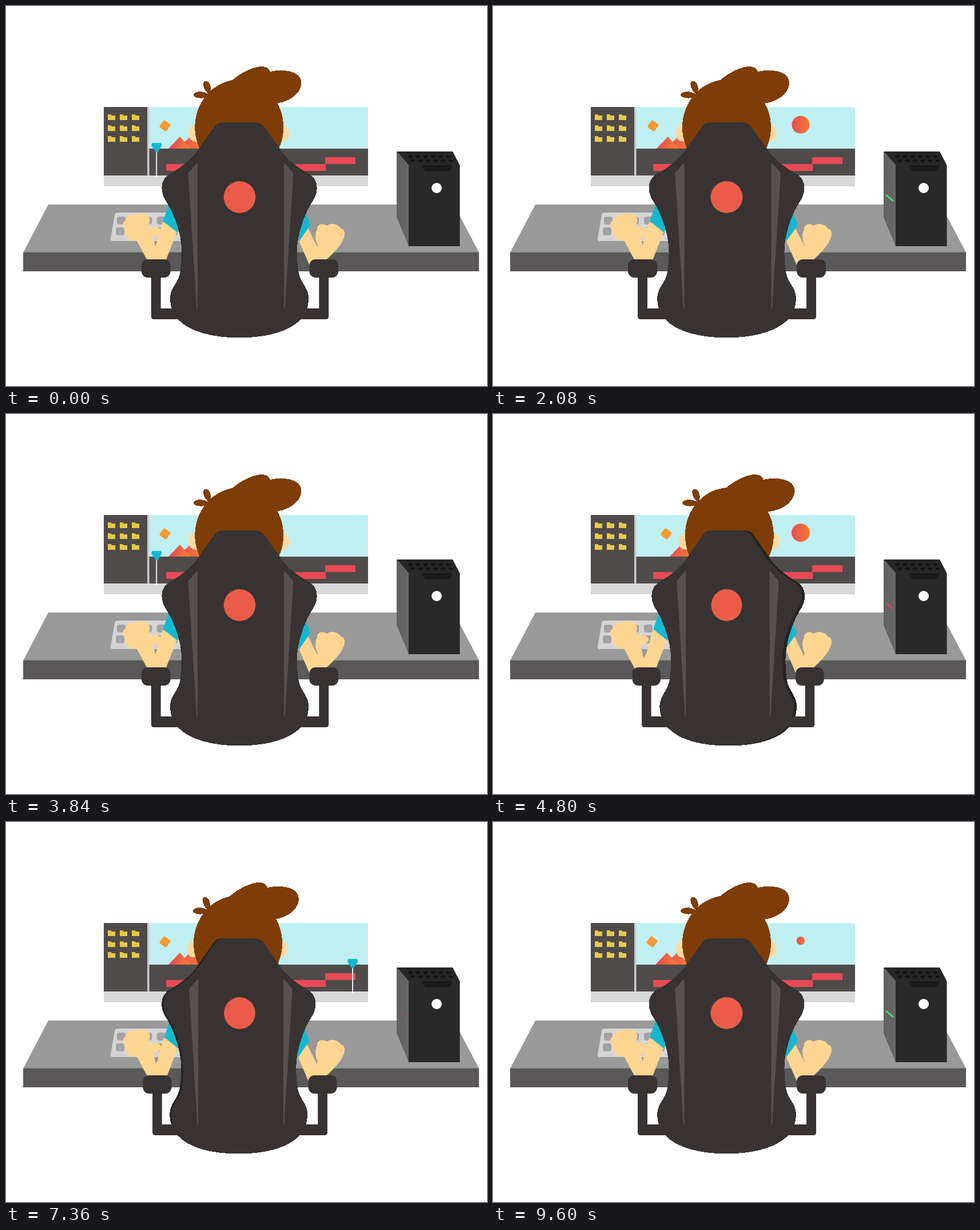
Write an HTML page without scripts that moves like this. It is 841x666 px and loops after 9680 ms.

```html
<!DOCTYPE html>
<html lang="en">
<head>
<meta charset="utf-8">
<title>At the desk</title>
<style>
@property --t { syntax: "<number>"; inherits: true; initial-value: 0; }

html, body { margin: 0; width: 100%; height: 100%; overflow: hidden; background: #fff; }

/* --t is the time in ms inside a 3840 ms cycle; the loop cuts the third cycle short */
@keyframes clock {
  0% { --t: 0; animation-timing-function: steps(48); }
  39.6694% { --t: 3840; animation-timing-function: step-end; }
  39.66941% { --t: 0; animation-timing-function: steps(48); }
  79.3388% { --t: 3840; animation-timing-function: step-end; }
  79.33881% { --t: 0; animation-timing-function: steps(25); }
  100% { --t: 2000; }
}

/* Each cosine is one eased move; angle = (time - start) * 180deg / length */
svg {
  display: block; width: 100%; height: 100%;
  animation: clock 9.68s infinite;
  --turn: calc(
    -1 * cos(clamp(0deg, (var(--t) + 940) * 180deg / 2080, 180deg))
    + cos(clamp(0deg, (var(--t) - 1140) * 180deg / 540, 180deg)) / 2
    + cos(clamp(0deg, (var(--t) - 2080) * 180deg / 820, 180deg)) / 2
    - cos(clamp(0deg, (var(--t) - 2900) * 180deg / 2080, 180deg)));
  --turned: max(var(--turn), -1 * var(--turn));
  --slide: calc((
    cos(clamp(0deg, (var(--t) - 920) * 180deg / 720, 180deg))
    - cos(clamp(0deg, var(--t) * 180deg / 920, 180deg))
    + cos(clamp(0deg, (var(--t) - 2840) * 180deg / 640, 180deg))
    - cos(clamp(0deg, (var(--t) - 1920) * 180deg / 920, 180deg))) / 2);
  --sun: calc((
    cos(clamp(0deg, (var(--t) - 1440) * 180deg / 200, 180deg))
    - cos(clamp(0deg, var(--t) * 180deg / 320, 180deg))
    + cos(clamp(0deg, (var(--t) - 3240) * 180deg / 240, 180deg))
    - cos(clamp(0deg, (var(--t) - 1740) * 180deg / 380, 180deg))) / 2);
  --red: calc((
    cos(clamp(0deg, (var(--t) - 1100) * 180deg / 400, 180deg))
    - cos(clamp(0deg, (var(--t) - 320) * 180deg / 320, 180deg))
    + cos(clamp(0deg, (var(--t) - 3300) * 180deg / 340, 180deg))
    - cos(clamp(0deg, (var(--t) - 2900) * 180deg / 300, 180deg))) / 2);
  --green: calc((
    cos(clamp(0deg, (var(--t) - 2300) * 180deg / 400, 180deg))
    - cos(clamp(0deg, (var(--t) - 1740) * 180deg / 140, 180deg))) / 2);
}

.slide { transform: translateX(calc(var(--slide) * 25px)); }
.sun { transform-origin: 538px 208px; transform: scale(var(--sun)); }
.playhead { transform: translateX(calc(var(--t) * .0974px)); }
.led-red { opacity: var(--red); }
.led-green { opacity: var(--green); }
.typing { transform: translateX(calc(sin(var(--t) * 180deg / 3840) * .8px)); }
.skull { transform: translateX(calc(var(--turn) * 5px)); }
.tuft { transform: translateX(calc(var(--turn) * 10px)); }
.sprig { transform: translateX(calc(var(--turn) * 3px)); }
.chair { transform-origin: 408.5px 0; transform: scaleX(calc(1 - .037 * var(--turned))); }
.arms {
  transform-origin: 409px 0;
  transform: translateX(calc(max(var(--turn), 0) * 2.2px)) scaleX(calc(1 - .033 * var(--turned)));
}
.depth { transform: translateX(calc(var(--turn) * 6px)); }
.crisp { shape-rendering: crispEdges; }
</style>
</head>
<body>
<svg viewBox="0 0 841 666" xmlns="http://www.w3.org/2000/svg">
  <defs>
    <linearGradient id="warm">
      <stop stop-color="#e84a57"/><stop offset="1" stop-color="#f08031"/>
    </linearGradient>
    <linearGradient id="side" x2="1" y2=".3">
      <stop stop-color="#606060"/><stop offset="1" stop-color="#686868"/>
    </linearGradient>
    <clipPath id="screen"><path d="M251 177H633V300H251z"/></clipPath>
    <path id="folder" d="M0 0h5l2 2h6v8H0z"/>
    <g id="folders">
      <use href="#folder"/><use href="#folder" x="21"/><use href="#folder" x="42"/>
    </g>
    <rect id="key" width="15" height="14" rx="4"/>
    <g id="keys">
      <use href="#key"/><use href="#key" x="23"/><use href="#key" x="46"/><use href="#key" x="70"/><use href="#key" x="93"/>
    </g>
    <ellipse id="hole" rx="4" ry="2.3"/>
    <g id="holes">
      <use href="#hole"/><use href="#hole" x="13.3"/><use href="#hole" x="26.6"/>
      <use href="#hole" x="40"/><use href="#hole" x="53.3"/><use href="#hole" x="66.6"/>
    </g>
    <path id="half" d="M407 204H436C445 204 449 208 452 212L479 250Q492 271 526 292C550 302 548 328 535 345C525 360 516 385 512 405C508 425 509 446 512 466C516 488 530 492 530 514C529 530 524 541 517 548C496 572 452 581.500 407 581.500z"/>
    <g id="back">
      <use href="#half"/><use href="#half" transform="matrix(-1 0 0 1 817 0)"/>
    </g>
    <g id="armrest">
      <rect x="531" y="444" width="51" height="32" rx="11"/>
      <path d="M548 470H565V544Q565 549 560 549H500V530H548z"/>
    </g>
  </defs>

  <!-- monitor -->
  <path fill="#d9d8d9" d="M171 290H633V316H171z"/>
  <path fill="#c0eff1" d="M246 177H633V250H246z"/>
  <g clip-path="url(#screen)">
    <g class="slide">
      <path fill="url(#warm)" d="M300 250L322 229L345 250z"/>
      <path fill="url(#warm)" d="M284 250L304 229L324 250z"/>
      <rect x="270.5" y="202.5" width="15" height="15" rx="3" fill="#f59b32" transform="rotate(38 278 210)"/>
    </g>
    <circle class="sun" cx="538" cy="208" r="16" fill="url(#warm)"/>
  </g>
  <path fill="#4f4b4b" d="M171 177H247V297H171zM250 250H633V297H250z"/>
  <path fill="#c8c8c9" d="M247 177H250.500V297H247z"/>
  <g fill="#e6c947">
    <use href="#folders" x="178" y="190"/><use href="#folders" x="178" y="209"/><use href="#folders" x="178" y="228"/>
  </g>
  <g fill="#e84a57">
    <rect x="280" y="277" width="70" height="12" rx="1.500"/>
    <rect x="480" y="277" width="79" height="12" rx="1.500"/>
    <rect x="558" y="265" width="53" height="12" rx="1.500"/>
  </g>
  <g clip-path="url(#screen)">
    <g class="playhead">
      <path fill="#fff" d="M262.300 254h1.800v46h-1.800z"/>
      <path fill="#14b8cf" d="M256 240H270Q273 241 272 245L266 255Q263.500 258 261 255L254.500 245Q253.500 241 256 240z"/>
    </g>
  </g>

  <!-- desk -->
  <path fill="#999" d="M74 348H783L827 432H30z"/>
  <path fill="#5a5858" d="M30 432H827V465H30z"/>
  <path fill="#48604f" d="M30 431.700H827V433H30z"/>

  <!-- tower -->
  <path fill="url(#side)" d="M683 255L704 279V421L683 370z"/>
  <path fill="#252626" d="M683 255H781L793.500 279H704z"/>
  <path fill="#292929" d="M704 279H793.500V421H704z"/>
  <path fill="#2f3a33" d="M704 278.500H793V279.300H704z"/>
  <path fill="#1b1b1b" d="M726 279H782L775 290H734z"/>
  <g fill="#151515">
    <use href="#holes" x="707" y="264"/><use href="#holes" x="711" y="271"/>
  </g>
  <circle cx="753" cy="319" r="9" fill="#fff"/>
  <g fill="none">
    <path class="led-red" stroke="#e5485a" stroke-width="1.800" d="M687 331L700 342"/>
    <path class="led-green" stroke="#4fe070" stroke-width="2.300" d="M687 331L700 342"/>
  </g>

  <!-- keyboard -->
  <path fill="#d5d4d5" d="M195 362H320V412H187Q182 412 183 407L190 366Q191 362 195 362z"/>
  <g fill="#a3a3a3">
    <use href="#keys" x="194" y="369"/><use href="#keys" x="192" y="388"/>
  </g>

  <!-- arms and hands -->
  <g fill="#ffd592">
    <path class="typing" d="M247 446L229 412C215 411 206 402 209 394C202 387 203 377 211 375C211 365 221 362 225 368C230 360 240 362 240 367C248 360 254 371 250 383C252 390 258 387 266 388C274 392 273 401 263 403L257 404L267 446z"/>
    <path d="M556 448C576 432 594 410 592 397C591 390 586 392 583 387C574 379 565 382 561 385C552 379 543 384 544 392C539 400 541 411 545 420L534 448z"/>
  </g>
  <g class="arms">
    <path fill="#ffd592" d="M273 378L299 394L278 448H246L262 418z"/>
    <path fill="#ffd592" d="M525 382L512 410L531 454H555L544 420z"/>
    <path fill="#14b8cf" d="M285 346L274 377L299 397L312 370z"/>
    <path fill="#14b8cf" d="M525 364L533 384L513 412L500 390z"/>
  </g>

  <!-- head -->
  <g class="skull">
    <g fill="#fdd9a0">
      <ellipse cx="329" cy="223" rx="9" ry="14"/><ellipse cx="487" cy="223" rx="9" ry="14"/>
    </g>
    <ellipse class="crisp" cx="408.500" cy="212.500" rx="77.500" ry="83.500" fill="#7e3d06"/>
  </g>
  <g class="crisp" fill="#7e3d06">
    <path class="tuft" d="M385 135L397 130C415 115 435 106 449 106C458 106 462 111 463 115C486 110 518 113 518 135C518 152 499 168 473 171L400 165z"/>
    <path class="sprig" d="M354 154C346 147 343 135 347 132C354 129 361 139 358 151L364 160L352 160C343 163 330 162 328 156C330 149 345 148 354 154z"/>
  </g>

  <!-- chair -->
  <g class="chair crisp">
    <use class="depth" href="#back" fill="#272423"/>
  </g>
  <g class="arms" fill="#383332">
    <use href="#armrest"/><use href="#armrest" transform="matrix(-1 0 0 1 818 0)"/>
  </g>
  <g class="chair">
    <use class="crisp" href="#back" fill="#383332"/>
    <path fill="#575050" d="M334.500 274V530H333L318 293zM486.500 274V530H488L503 293z"/>
    <circle cx="408.500" cy="335" r="28" fill="#ea5c49"/>
  </g>
</svg>
</body>
</html>
```
